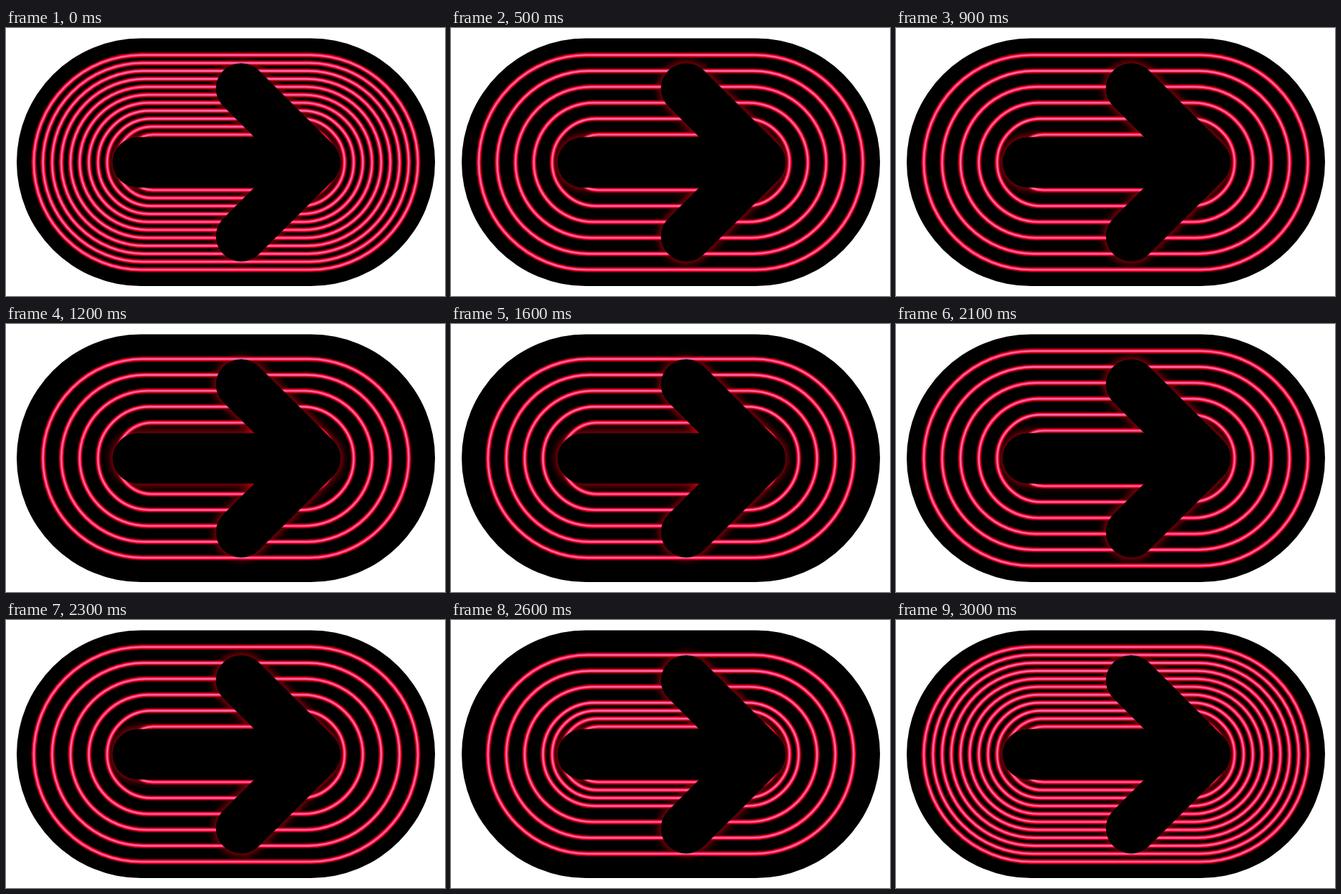
Recreate the animation shown at these times as an HTML page. Size 616x377 px, loop 3100 ms.

```html
<!DOCTYPE html>
<html>
<head>
<meta charset="utf-8">
<title>Neon arrow</title>
<style>
  html, body { margin: 0; width: 100%; height: 100%; overflow: hidden; background: #fff; }
  svg { display: block; }
  .arrow { fill: none; stroke: #000; stroke-width: 71; stroke-linecap: round; stroke-linejoin: round; }
  .halo { stroke: #e60010; filter: url(#blur); }
</style>
</head>
<body>
<svg width="616" height="377" viewBox="0 0 616 377">
  <defs>
    <filter id="blur" filterUnits="userSpaceOnUse" x="0" y="0" width="616" height="377" color-interpolation-filters="sRGB">
      <feGaussianBlur stdDeviation="7"/>
    </filter>
    <path id="shape" d="M185 189H434M330 85L434 189L330 293"/>
  </defs>
  <rect x="15" y="14.5" width="587" height="348.5" rx="174.25"/>
  <use href="#shape" class="arrow halo"/>
  <g id="rings" fill="none"></g>
  <use href="#shape" class="arrow"/>
</svg>
<script>
const NS = 'http://www.w3.org/2000/svg';
const COUNT = 11, LOOP = 3100, STEP = 100;
// Neon tube layers, from the glow to the core
const LAYERS = [['#5a0008', 8], ['#f2001c', 5.4], ['#ff2a62', 3.2], ['#ff74bc', 1.6]];

function add(parent, tag, attrs = {}) {
  const el = parent.appendChild(document.createElementNS(NS, tag));
  for (const name in attrs) el.setAttribute(name, attrs[name]);
  return el;
}

// Ring 0 is the outermost
const rings = Array.from({ length: COUNT }, (_, i) => {
  const group = add(document.getElementById('rings'), 'g');
  const halfW = 269.5 - 12.87 * i, halfH = 151 - 11.2 * i;
  for (const [stroke, width] of LAYERS) {
    add(group, 'rect', {
      x: 308.5 - halfW, y: 189 - halfH, width: 2 * halfW, height: 2 * halfH,
      rx: halfH, stroke, 'stroke-width': width
    });
  }
  return group;
});

// All lit, then even and odd rings alternate, then the even ones fill in from the centre
function isLit(i, step) {
  if (step < 3) return true;
  const odd = i % 2 === 1;
  if (step < 24) return odd === (step % 2 === 0);
  return odd || (COUNT - 1 - i) / 2 < step - 24;
}

function draw(now) {
  const step = Math.floor(now % LOOP / STEP);
  rings.forEach((ring, i) => ring.setAttribute('visibility', isLit(i, step) ? 'visible' : 'hidden'));
  requestAnimationFrame(draw);
}
draw(performance.now());
</script>
</body>
</html>
```
